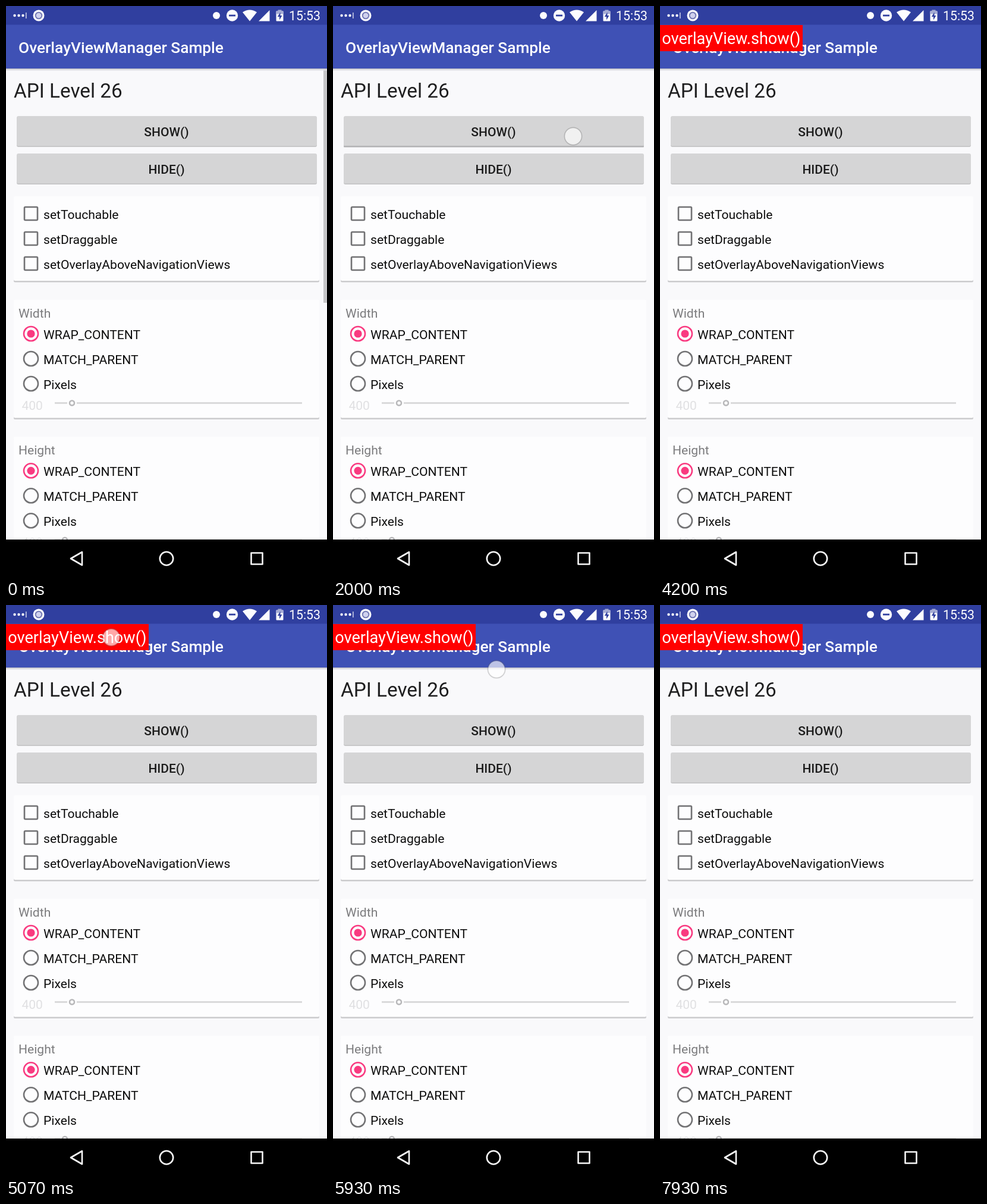
These frames come from a looping animation (540 px wide and 960 px high, 8 s). An HTML page:

```html
<!DOCTYPE html>
<html lang="en">
<head>
<meta charset="utf-8">
<title>Overlay sample</title>
<style>
html, body { margin: 0; width: 100%; height: 100%; overflow: hidden; background: #000; }
svg { display: block; width: 540px; height: 960px; font-family: Roboto, "Noto Sans", sans-serif; }
.medium { font-weight: 500; }
.box { fill: none; stroke: #727274; stroke-width: 2.6; }
.on { stroke: #f93a80; }
.track { stroke: #dadadb; stroke-width: 2.8; }
.thumb { fill: none; stroke: #b8b8ba; stroke-width: 2.6; }
.nav { fill: none; stroke: #f8f8f8; stroke-width: 2.6; stroke-linejoin: round; }
</style>
</head>
<body>
<svg id="stage" viewBox="0 0 540 960">
  <defs><clipPath id="page"><rect width="540" height="897"/></clipPath></defs>
  <g id="content" clip-path="url(#page)"></g>
  <g id="bars"></g>
  <g id="overlay"></g>
  <g id="touch">
    <circle r="14" fill="#fff" opacity=".66"/>
    <circle r="14.6" fill="none" stroke="#666" stroke-width="1.6" opacity=".3"/>
  </g>
</svg>
<script>
const LOOP = 8000;
const NS = "http://www.w3.org/2000/svg";
const $ = id => document.getElementById(id);
const content = $("content"), bars = $("bars"), overlay = $("overlay");

function add(parent, tag, attrs, text) {
  const el = document.createElementNS(NS, tag);
  for (const key in attrs) el.setAttribute(key, attrs[key]);
  if (text) el.textContent = text;
  parent.append(el);
  return el;
}
const rect = (p, x, y, width, height, fill, more) =>
  add(p, "rect", { x, y, width, height, fill, ...more });
const circle = (p, cx, cy, r, more) => add(p, "circle", { cx, cy, r, ...more });
const path = (p, d, more) => add(p, "path", { d, ...more });
const label = (p, x, y, str, size = 21.1, fill = "#0c0c0c", more) =>
  add(p, "text", { x, y, "font-size": size, fill, ...more }, str);

// Page
rect(content, 0, 0, 540, 960, "#f9f9fb");
label(content, 13, 154, "API Level 26", 33.3, "#1e1e1f");

function button(y, str) {
  rect(content, 18, y + 1.2, 505, 50.8, "#c2c2c3", { rx: 3 });
  rect(content, 18, y, 505, 50.5, "#d5d5d6", { rx: 3 });
  label(content, 270, y + 33.5, str, 21, "#1b1b1b", { class: "medium", "text-anchor": "middle" });
}
button(185, "SHOW()");
button(248, "HIDE()");
const press = rect(content, 18, 235, 505, 2.5, "#b2b2b4", { rx: 1 });

function card(y, height) {
  rect(content, 13, y + 2, 514, height + .5, "#cbcbcd", { rx: 2 });
  rect(content, 13, y, 514, height, "#fdfdfe", { rx: 2 });
}

card(320, 142);
["setTouchable", "setDraggable", "setOverlayAboveNavigationViews"].forEach((str, i) => {
  const y = 349 + i * 42;
  add(content, "rect", { x: 31, y: y - 11, width: 22, height: 22, rx: 1.5, class: "box" });
  label(content, 63, y + 8.5, str);
});

function sizeCard(y, title, thumbX) {
  card(y, 198.5);
  label(content, 21, y + 30, title, 21.1, "#7c7c7e");
  ["WRAP_CONTENT", "MATCH_PARENT", "Pixels"].forEach((str, i) => {
    const cy = y + 57 + i * 42;
    circle(content, 42, cy, 12, { class: i ? "box" : "box on" });
    if (!i) circle(content, 42, cy, 6.6, { fill: "#f93a80" });
    label(content, 63, cy + 8.5, str);
  });
  const sy = y + 173.5;
  label(content, 26.5, y + 185, "400", 21, "#e0e0e2");
  path(content, `M82 ${sy}H${thumbX - 8}M${thumbX + 8} ${sy}H498`, { class: "track" });
  circle(content, thumbX, sy, 4, { class: "thumb" });
}
sizeCard(494, "Width", 111);
sizeCard(724.3, "Height", 99);
const scrollbar = rect(content, 534, 105, 6, 394, "#c6c6c8");

// App bar
rect(bars, 0, 105, 540, 1.5, "#b5b6c0");
rect(bars, 0, 106.5, 540, 2, "#e2e2e6");
rect(bars, 0, 31, 540, 74, "#3f51b5");
label(bars, 21, 78.5, "OverlayViewManager Sample", 26.3, "#fff", { class: "medium" });

// Status bar
const STATUS = "#303f9f", DIM = "#a6acd4";
const light = { fill: "#fcfcfe" };
rect(bars, 0, 0, 540, 31.5, STATUS);
[14.5, 21.5, 28.5].forEach(x => circle(bars, x, 16, 2.2, light));
rect(bars, 33, 11, 1.6, 10, "#c5c9e4");
circle(bars, 55, 16, 9.5, light);
circle(bars, 55, 16, 5.3, { fill: "#d0d2ee", stroke: "#757bb5", "stroke-width": 2 });
circle(bars, 354, 16, 6, light);
circle(bars, 380.5, 16, 9.7, light);
rect(bars, 375, 14.6, 11, 2.8, STATUS);
path(bars, "M410 25.5L398 10.6Q410 2.4 422 10.6Z", light);
path(bars, "M425 25.5L443.5 7V25.5Z", light);
rect(bars, 454.5, 8.5, 12, 17, "#fcfcfe", { rx: 1 });
rect(bars, 457.5, 6.5, 6, 3, DIM);
rect(bars, 454.5, 8.5, 12, 5, DIM, { rx: 1 });
path(bars, "M461.5 10.5L456.8 18H460V23.5L464.5 16H461.5Z", { fill: STATUS });
label(bars, 476, 24, "15:53", 21.3, "#fcfcfe");

// Navigation bar
rect(bars, 0, 897, 540, 63, "#000");
path(bars, "M128 918V940L109 929Z", { class: "nav" });
circle(bars, 270, 929, 11.2, { class: "nav" });
add(bars, "rect", { x: 412.5, y: 919.5, width: 19, height: 19, class: "nav" });

// Floating view
rect(overlay, 0, 32, 240, 44, "#f00");
label(overlay, 3.2, 64, "overlayView.show()", 27.1, "#fff");

// Each row: time in ms, then the styles at that time
function play(el, rows) {
  const frames = rows.map(([t, style]) => ({ offset: t / LOOP, ...style }));
  el.animate(frames, { duration: LOOP, iterations: Infinity }).startTime = 0;
}
const fade = (el, rows) => play(el, rows.map(([t, opacity]) => [t, { opacity }]));
const at = (x, y) => ({ transform: `translate(${x}px, ${y}px)` });

const SHOW = 2130;
fade(scrollbar, [[0, 1], [70, 1], [600, 0], [LOOP, 0]]);
fade(press, [[0, 0], [1800, 0], [1930, 1], [SHOW, 1], [2330, 0], [LOOP, 0]]);
fade(overlay, [[0, 0], [SHOW, 0], [SHOW, 1], [LOOP, 1]]);
fade($("touch"), [
  [0, 0], [1800, 0], [1870, 1], [2070, 1], [2140, 0],
  [4870, 0], [4940, 1], [6260, 1], [6330, 0], [LOOP, 0]
]);
play($("touch"), [
  [0, at(404, 219)], [2500, at(404, 219)], [2500, at(150, 55)],
  [4940, at(150, 55)], [5400, at(245, 53)], [5670, at(268, 88)],
  [5930, at(275, 108)], [6260, at(277, 112)], [LOOP, at(277, 112)]
]);
</script>
</body>
</html>
```
